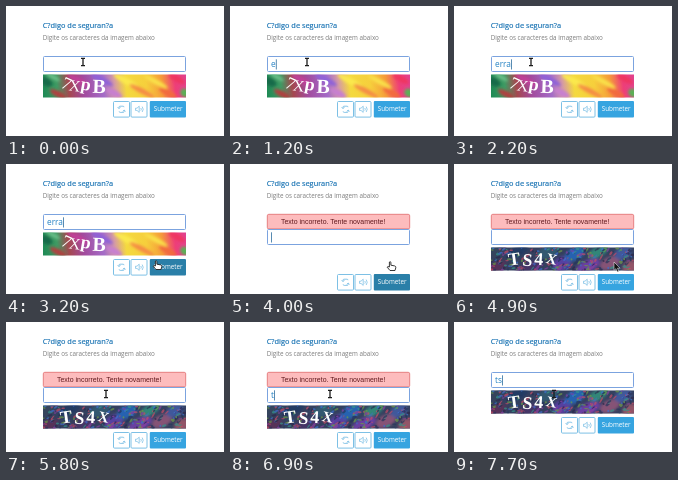
These frames come from a looping animation (218 px wide and 130 px high, 8000 ms). An HTML page:

```html
<!DOCTYPE html>
<html lang="pt">
<head>
<meta charset="utf-8">
<title>Código de segurança</title>
<style>
  html, body { margin: 0; width: 100%; height: 100%; overflow: hidden; background: #fff; }
  svg { display: block; width: 218px; height: 130px; }
  text { font-family: "Open Sans", "Noto Sans", sans-serif; }
  .title { font-size: 7.4px; fill: #0f6db0; stroke: #0f6db0; stroke-width: .15px; }
  .hint { font-size: 6.28px; fill: #7c7c7c; }
  .msg { font: 6.95px "Liberation Sans", Arial, sans-serif; fill: #611a1e; }
  .typed { font-size: 8.3px; fill: #2482c4; }
  .send { font-size: 6.3px; fill: #fff; }
  .code { font-family: "Liberation Serif", serif; fill: #fff; }
  .line { fill: none; stroke: #6fb9e3; stroke-width: .9px; }
</style>
</head>
<body>
<svg viewBox="0 0 218 130">
  <defs>
    <clipPath id="frame"><rect x="37" y="68.5" width="143" height="23"/></clipPath>
    <filter id="soft" x="-20%" y="-50%" width="140%" height="200%"><feGaussianBlur stdDeviation="1.8"/></filter>
    <filter id="fine" x="-20%" y="-50%" width="140%" height="200%"><feGaussianBlur stdDeviation=".4"/></filter>
    <linearGradient id="rainbow" gradientUnits="userSpaceOnUse" x1="37" y1="85" x2="180" y2="72">
      <stop offset="0" stop-color="#1f8a55"/>
      <stop offset=".1" stop-color="#3f9a63"/>
      <stop offset=".18" stop-color="#a5484f"/>
      <stop offset=".28" stop-color="#a24a9c"/>
      <stop offset=".42" stop-color="#a46cc8"/>
      <stop offset=".5" stop-color="#d59aa4"/>
      <stop offset=".58" stop-color="#f4d93f"/>
      <stop offset=".72" stop-color="#f6cf3c"/>
      <stop offset=".83" stop-color="#f59a3a"/>
      <stop offset=".92" stop-color="#ee3f78"/>
      <stop offset="1" stop-color="#e0428f"/>
    </linearGradient>
  </defs>
  <rect width="218" height="130" fill="#fff"/>
  <text class="title" x="36.7" y="22">C?digo de seguran?a</text>
  <text class="hint" x="36.7" y="34.4">Digite os caracteres da imagem abaixo</text>

  <g id="error">
    <rect x="37.3" y="50.3" width="142.4" height="14.6" rx="1.5" fill="#fdbcbd" stroke="#e06a6d" stroke-width=".8"/>
    <text class="msg" x="51" y="60.2">Texto incorreto. Tente novamente!</text>
  </g>

  <g id="form">
    <rect x="37.5" y="50.5" width="142" height="15" rx="1" fill="#fff" stroke="#7ba3df"/>
    <text class="typed" id="typed" x="41" y="61.2"></text>
    <rect id="caret" y="53.3" width=".8" height="10.2" fill="#2f6f9f"/>

    <g id="warm" clip-path="url(#frame)"></g>
    <g id="dark" clip-path="url(#frame)"></g>

    <g class="line">
      <rect x="107.5" y="95.5" width="16" height="15.6" rx="1"/>
      <rect x="125" y="95.5" width="16" height="15.6" rx="1"/>
      <path d="M113 102.4v-1.2q0-1 1-1h3q1 0 1 1M118.2 104.2v1.2q0 1-1 1h-3q-1 0-1-1M111.6 101.2l1.4 1.4 1.4-1.4M116.8 105.4l1.4-1.4 1.4 1.4" stroke-width=".8"/>
      <path d="M129.5 102.2h1.5l2.2-2v6.2l-2.2-2h-1.5zM134.8 102q1 1.3 0 2.6M136.2 100.6q2 2.7 0 5.4" stroke-width=".7"/>
    </g>
    <rect id="button" x="143.8" y="95" width="36.2" height="16.5" rx="1"/>
    <text class="send" x="147.8" y="105.3">Submeter</text>
  </g>

  <g id="beam"><path d="M-2-3.7H2M0-3.7V3.7M-2 3.7H2" fill="none" stroke="#1c1c1c" stroke-width="1.3"/></g>
  <g id="hand"><path d="M-1.6-4q.9-.7 1.5.2V-.8l3.7.7q1.4.3 1.2 1.8L4 4.5H-1L-3.8 1.2q0-1.2 2.2-.2z" fill="#fff" stroke="#222" stroke-width=".9"/></g>
  <g id="arrow"><path d="M0 0v8.4l1.9-1.7 1.5 3.3 1.5-.7-1.4-3.1h2.6z" fill="#111" stroke="#fff" stroke-width=".5"/></g>
</svg>
<script>
const LOOP = 8000, STEP = 100;
const $ = id => document.getElementById(id);
const add = (parent, tag, attrs, text) => {
  const el = document.createElementNS('http://www.w3.org/2000/svg', tag);
  for (const k in attrs) el.setAttribute(k, attrs[k]);
  if (text) el.textContent = text;
  return parent.appendChild(el);
};
const seeded = s => () => (s = (s * 16807) % 2147483647) / 2147483647;

// Blurred streaks [x, y, rx, ry, colour], speckles, then tilted letters
function captcha(id, { base, slope, streaks, specks, colours, letters, seed }) {
  const g = $(id), rand = seeded(seed);
  add(g, 'rect', { x: 37, y: 68, width: 143, height: 24, fill: base });
  const soft = add(g, 'g', { filter: 'url(#soft)' });
  for (const [x, y, rx, ry, fill] of streaks)
    add(soft, 'ellipse', { cx: x, cy: y, rx, ry, fill, transform: `rotate(${slope} ${x} ${y})` });
  const fine = add(g, 'g', { filter: 'url(#fine)', opacity: .7 });
  for (let i = 0; i < specks; i++) {
    const x = 37 + rand() * 143, y = 68 + rand() * 24;
    add(fine, 'ellipse', {
      cx: x, cy: y, rx: .8 + rand() * 1.8, ry: .5 + rand() * .8,
      fill: colours[Math.floor(rand() * colours.length)],
      transform: `rotate(${slope - 35 + rand() * 70} ${x} ${y})`
    });
  }
  for (const [ch, x, y, size, turn, weight] of letters)
    add(g, 'text', {
      class: 'code', 'font-size': size, 'text-anchor': 'middle', 'font-weight': weight,
      transform: `translate(${x} ${y}) rotate(${turn})`
    }, ch);
}

captcha('warm', {
  base: 'url(#rainbow)', slope: 28, seed: 71, specks: 0, colours: [],
  streaks: [
    [40, 76, 7, 4, '#136b4a'], [47, 71, 8, 2, '#6cc08a'], [52, 88, 9, 3, '#b0413f'],
    [72, 74, 12, 3, '#c0409a'], [96, 74, 12, 3, '#8f62d8'], [108, 87, 9, 3, '#c77fd0'],
    [120, 75, 14, 3, '#fbe94e'], [136, 85, 14, 2.5, '#f58a45'], [150, 76, 13, 2.5, '#f9e04a'],
    [162, 87, 10, 3, '#f26a3c'], [171, 73, 9, 3, '#ef3560'], [179, 87, 5, 4, '#58b255']
  ],
  letters: [['7', 58, 83, 18, 24, 400], ['X', 68, 85, 16, 8, 400],
    ['p', 79, 84, 18, 10, 700], ['B', 93, 87, 20, 2, 700]]
});

captcha('dark', {
  base: '#34405f', slope: -25, seed: 29, specks: 300,
  colours: ['#25365c', '#3f70d0', '#35958a', '#8a3fa0', '#c64c66', '#2e284c', '#6f9c48'],
  streaks: [
    [43, 73, 10, 5, '#35445d'], [43, 88, 10, 5, '#573258'], [63, 73, 12, 5, '#233a64'],
    [75, 88, 16, 5, '#443566'], [94, 73, 12, 6, '#315970'], [108, 85, 10, 7, '#5740a0'],
    [121, 75, 11, 6, '#2662b0'], [134, 87, 13, 6, '#6a40a0'], [144, 73, 10, 5, '#328678'],
    [156, 84, 11, 6, '#865276'], [169, 74, 9, 6, '#3f589b'], [176, 88, 8, 6, '#925568']
  ],
  letters: [['T', 61, 86, 18, -8, 700], ['S', 73, 87, 18, 5, 700],
    ['4', 84.5, 86, 18, 3, 700], ['X', 96.5, 85, 15, 12, 700]]
});

// [time, value] steps: the last one reached holds
const TYPED = [[0, ''], [1000, 'e'], [1300, 'err'], [1400, 'erra'], [3800, ''], [6900, 't'], [7600, 'ts']];
const CARET = [[0, 0], [300, 1], [800, 0], [1000, 1], [1600, 0], [2200, 1], [2800, 0], [3100, 1],
  [4300, 0], [5200, 1], [5700, 0], [6100, 1], [6500, 0], [6900, 1]];
const ERROR = [[0, 0], [3800, 1], [7000, 0]];
const IMAGE = [[0, 'warm'], [3800, ''], [4600, 'dark']];
const POINTER = [[0, 'beam'], [2900, 'arrow'], [3100, 'hand'], [4300, 'arrow'], [5400, 'beam']];
// [time, x, y] and [time, amount]: eased between points
const PATH = [[0, 77, 56], [2800, 77, 56], [3200, 151, 101], [3700, 151, 101], [4000, 161, 102],
  [4300, 160, 98], [5100, 160, 98], [5400, 100, 72], [8000, 100, 72]];
const HOVER = [[0, 0], [3000, 0], [3200, 1], [4100, 1], [4300, 0], [8000, 0]];

const at = (steps, t) => steps.filter(s => s[0] <= t).pop()[1];
function glide(keys, t) {
  const i = keys.findIndex(k => k[0] > t), a = keys[i - 1], b = keys[i];
  const p = (t - a[0]) / (b[0] - a[0]), e = p * p * (3 - 2 * p);
  return a.slice(1).map((v, n) => v + (b[n + 1] - v) * e);
}
const show = (id, on) => $(id).style.display = on ? '' : 'none';
const mix = (a, b, p) => `rgb(${a.map((v, i) => Math.round(v + (b[i] - v) * p))})`;

function draw(time) {
  const t = Math.floor(time % LOOP / STEP) * STEP;
  const failed = at(ERROR, t), image = at(IMAGE, t), pointer = at(POINTER, t);
  const [x, y] = glide(PATH, t);
  show('error', failed);
  $('form').setAttribute('transform', `translate(0 ${failed ? 15 : 0})`);
  for (const id of ['warm', 'dark']) show(id, id === image);
  const typed = $('typed');
  typed.textContent = at(TYPED, t);
  show('caret', at(CARET, t));
  $('caret').setAttribute('x', 41 + (typed.textContent ? typed.getComputedTextLength() + .2 : 0));
  $('button').setAttribute('fill', mix([54, 164, 224], [42, 127, 168], glide(HOVER, t)[0]));
  for (const id of ['beam', 'hand', 'arrow']) show(id, id === pointer);
  $(pointer).setAttribute('transform', `translate(${x} ${y})`);
}

const start = performance.now();
function tick() {
  draw(performance.now() - start);
  requestAnimationFrame(tick);
}
tick();
</script>
</body>
</html>
```
